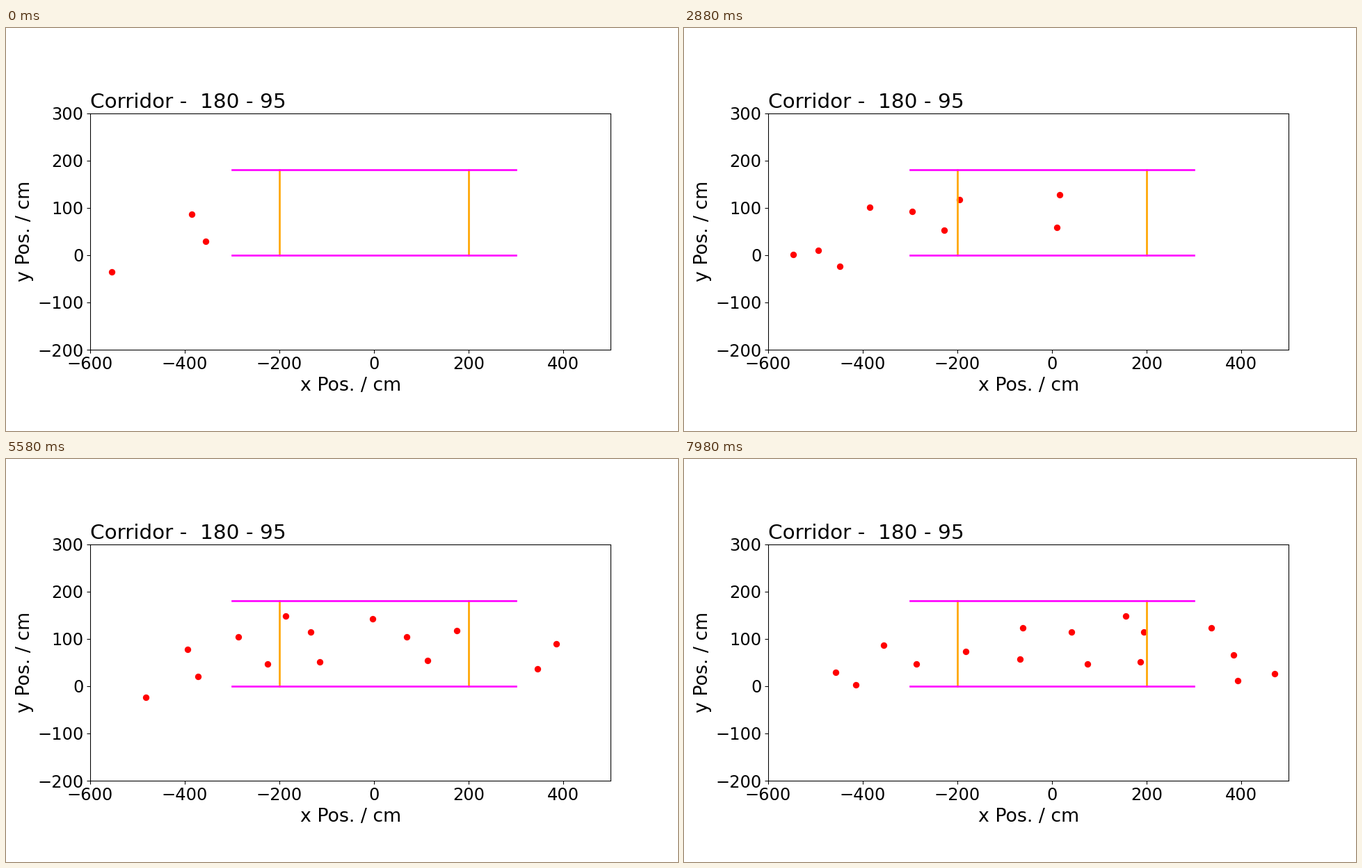
Write a matplotlib script that moves like this. It is 966 px wide and 580 px high and loops after 8 s.

```python
import numpy as np
import matplotlib.pyplot as plt
from matplotlib.animation import FuncAnimation

STEP_MS = 60       # time between two recorded positions
TICK_MS = 20
LOOP_MS = 8000

# Each walker: step at which the first door is passed, lane height in cm.
WALKERS = [
    (20.5, 59), (22.2, 128), (47.5, 117), (51.6, 54), (59.8, 104), (69.8, 143),
    (81.7, 51), (85, 115), (91.5, 148), (96.4, 47), (103.6, 114), (115.6, 57),
    (116.4, 123), (130.8, 74), (144.5, 56), (152, 116), (161.3, 60), (165, 110),
]
door_step, lane = np.array(WALKERS).T
speed = 7 + 0.0105 * lane      # cm per step, faster in the upper lanes


def past(value, limit):
    """Square of the amount by which value exceeds limit."""
    return np.maximum(value - limit, 0) ** 2


def positions(step):
    """Walkers curve up into the corridor, keep their lane and curve down."""
    u = step - door_step
    x = -200 + speed * u + 0.073 * past(-u, 25) - 0.051 * past(u, 60)
    y = lane - 0.00122 * past(-x, 200) - 0.00147 * past(x, 222)
    seen = (u > -55) & (y > -47)
    return x[seen], y[seen]


plt.rcParams.update({"font.family": "DejaVu Sans", "font.size": 18.1})
fig, ax = plt.subplots(figsize=(966 / 96, 580 / 96), dpi=96)
dots, = ax.plot([], [], "o", color="red", markersize=6)
for x in (-200, 200):
    ax.plot([x, x], [0, 180], color="orange", lw=2)
for y in (0, 180):
    ax.plot([-300, 300], [y, y], color="magenta", lw=2)

ax.set_aspect("equal")
ax.set_xlim(-600, 500)
ax.set_ylim(-200, 300)
ax.set_xticks(range(-600, 500, 200))
ax.set_yticks(range(-200, 301, 100))
ax.set_title("Corridor -  180 - 95", loc="left", fontsize=22.1)
ax.set_xlabel("x Pos. / cm", fontsize=20.1)
ax.set_ylabel("y Pos. / cm", fontsize=20.1)


def update(i):
    dots.set_data(*positions(i * TICK_MS // STEP_MS))
    return dots,


anim = FuncAnimation(fig, update, frames=LOOP_MS // TICK_MS, interval=TICK_MS,
                     repeat=True, repeat_delay=0)
plt.show()
```
